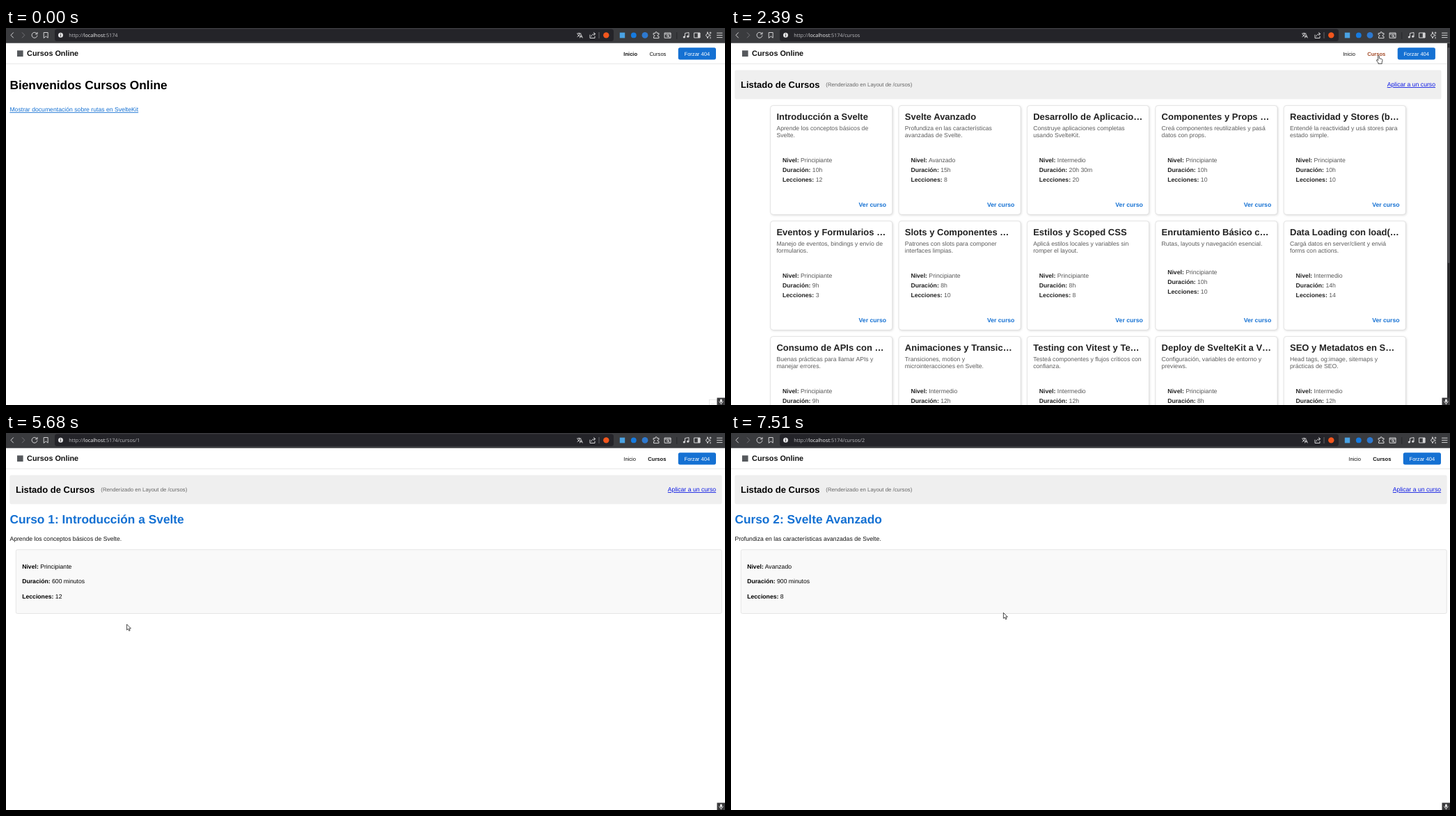
Recreate the animation shown at these times as an HTML page. Size 1033x542 px, loop 8000 ms.

```html
<!DOCTYPE html>
<html lang="es">
<head>
<meta charset="utf-8">
<title>Cursos Online</title>
<style>
html, body { margin: 0; width: 100%; height: 100%; overflow: hidden; background: #fff; }
svg { display: block; width: 1033px; height: 542px; }
text { font-family: "Liberation Sans", Arial, sans-serif; text-rendering: geometricPrecision; white-space: pre; }
.b { font-weight: 700; }
.u { text-decoration: underline; }
.end { text-anchor: end; }
.url { font-family: "Open Sans", sans-serif; }
.card { fill: #fff; stroke: #d2d2d2; stroke-width: .6; filter: drop-shadow(1px 1px 1.4px rgba(0,0,0,.13)); }
.icon { fill: none; stroke: #d4d4d6; stroke-width: 1; stroke-linecap: round; stroke-linejoin: round; }
</style>
</head>
<body>
<svg id="stage" viewBox="0 0 1033 542"></svg>
<script>
const BLUE = '#1571d3';
const LOOP = 8000;

const text = (x, y, size, str, fill = '#000', cls = '') =>
  `<text x="${x}" y="${y}" font-size="${size}" fill="${fill}" class="${cls}">${str}</text>`;
const rect = (x, y, w, h, fill, extra = '') =>
  `<rect x="${x}" y="${y}" width="${w}" height="${h}" fill="${fill}" ${extra}/>`;
const dot = (x, y, r, fill) => `<circle cx="${x}" cy="${y}" r="${r}" fill="${fill}"/>`;
const icon = (d, extra = '') => `<path class="icon" d="${d}" ${extra}/>`;
const field = (x, y, size, label, value, fill, valueFill = fill) =>
  text(x, y, size, `<tspan class="b">${label}:</tspan><tspan fill="${valueFill}"> ${value}</tspan>`, fill);

function browserBar() {
  return rect(0, 0, 1033, 21.7, '#3a3b3e') + rect(70, 1.5, 803, 17.5, '#242429', 'rx="3.5"') +
    icon('M10.5 6.7L7 10.3L10.5 14') +
    icon('M23.3 6.7L26.8 10.3L23.3 14', 'id="forward"') +
    icon('M44.5 8.2A4 4 0 1 0 45 11M45 6.4V8.8H42.5') +
    icon('M54.6 6.5H60.2V14.2L57.4 11.9L54.6 14.2Z') +
    dot(78.5, 10.3, 3.5, '#e2e2e4') + rect(78, 9.8, 1, 2.4, '#333') + rect(78, 8.1, 1, 1, '#333') +
    `<text x="90.3" y="13" font-size="7.25" fill="#bdbdc1" class="url">http://<tspan fill="#f4f4f5">localhost</tspan>:5174<tspan id="path"></tspan></text>` +
    icon('M820.5 8H826M823.2 7V8M825 8Q824 11 821 12.5M821.5 9.5L824 12M824.5 14L826.3 9.5L828.2 14M825.2 12.6H827.5', 'stroke-width=".8"') +
    icon('M839 10V14.5H846V12M841 12Q841 8.5 846.5 8.5M844.5 6.5L846.7 8.5L844.5 10.5') +
    rect(851.6, 6, .8, 9, '#77777b') +
    dot(862.3, 10.4, 4.2, '#f2561d') +
    rect(881.8, 6.6, 7.4, 7.8, '#4aa3e4') + dot(901.8, 10.4, 3.9, '#167be0') + dot(918, 10.4, 4.4, '#2e79cf') +
    icon('M930.5 7.5H933Q932.5 5.5 934.2 5.6Q935.8 5.6 935.3 7.5H938V9.6Q936 9.4 936 11Q936 12.5 938 12.2V14.6H930.5V12.3Q932 12.3 932 11Q932 9.7 930.5 9.7Z') +
    icon('M946.5 7H955V14.3H946.5ZM946.5 8.8H955M952 12.5L953.3 13.5') +
    '<circle class="icon" cx="950.8" cy="11.3" r="1.3"/>' +
    rect(963.4, 6, .8, 10, '#222327') +
    icon('M975.5 13V7.5L981 6.5V12') + dot(974.3, 13, 1.6, '#d4d4d6') + dot(979.7, 12.2, 1.6, '#d4d4d6') +
    icon('M989 7H997V14H989Z') + rect(993.8, 7, 3.4, 7, '#d4d4d6') +
    icon('M1008 6L1009.2 9.2L1012.4 10.5L1009.2 11.7L1008 14.8L1006.8 11.7L1005 10.5L1006.8 9.2ZM1012 6V8M1011 7H1013M1012 13V15') +
    icon('M1021.5 7.2H1029M1021.5 10.4H1029M1021.5 13.6H1029');
}

// Shared page header; the vertical scrollbar pushes the right side by 8 px.
function header(active, shift) {
  const home = active === 'Inicio';
  return rect(0, 51.2, 1033, .8, '#e4e4e4') +
    rect(16, 32.3, 8.6, 8.8, '#55585c') +
    text(30.1, 40.3, 10.83, 'Cursos Online', '#111', 'b') +
    text(887.3 - shift, 39.7, 7.58, 'Inicio', '#111', home ? 'b' : '') +
    text((home ? 924.4 : 922.3) - shift, 39.7, 7.58, 'Cursos', '#111', 'nav ' + (home ? '' : 'b')) +
    rect(965.8 - shift, 28.2, 54.2, 17.2, BLUE, 'rx="2.6"') +
    text(974.5 - shift, 39.7, 7.58, 'Forzar 404', '#fff');
}

const banner = shift => rect(5.4, 60.6, 1023.2 - shift, 41.6, '#efefef', 'rx="2.2"') +
  text(14, 85.7, 13, 'Listado de Cursos', '#000', 'b') +
  text(136.3, 84, 7.8, '(Renderizado en Layout de /cursos)', '#666') +
  text(1020.1 - shift, 84, 8.67, 'Aplicar a un curso', '#0b18e4', 'u end');

const homePage = header('Inicio', 0) +
  text(5.4, 88, 17.33, 'Bienvenidos Cursos Online', '#000', 'b') +
  text(5.4, 120.2, 8.67, 'Mostrar documentación sobre rutas en SvelteKit', BLUE, 'u');

const courses = `Introducción a Svelte|Aprende los conceptos básicos de|Svelte.|Principiante|10h|12
Svelte Avanzado|Profundiza en las características|avanzadas de Svelte.|Avanzado|15h|8
Desarrollo de Aplicacio…|Construye aplicaciones completas|usando SvelteKit.|Intermedio|20h 30m|20
Componentes y Props …|Creá componentes reutilizables y pasá|datos con props.|Principiante|10h|10
Reactividad y Stores (b…|Entendé la reactividad y usá stores para|estado simple.|Principiante|10h|10
Eventos y Formularios …|Manejo de eventos, bindings y envío de|formularios.|Principiante|9h|3
Slots y Componentes …|Patrones con slots para componer|interfaces limpias.|Principiante|8h|10
Estilos y Scoped CSS|Aplicá estilos locales y variables sin|romper el layout.|Principiante|8h|8
Enrutamiento Básico c…|Rutas, layouts y navegación esencial.||Principiante|10h|10
Data Loading con load(…|Cargá datos en server/client y enviá|forms con actions.|Intermedio|14h|14
Consumo de APIs con …|Buenas prácticas para llamar APIs y|manejar errores.|Principiante|9h|10
Animaciones y Transic…|Transiciones, motion y|microinteracciones en Svelte.|Intermedio|12h|10
Testing con Vitest y Te…|Testeá componentes y flujos críticos con|confianza.|Intermedio|12h|10
Deploy de SvelteKit a V…|Configuración, variables de entorno y|previews.|Principiante|8h|10
SEO y Metadatos en S…|Head tags, og:image, sitemaps y|prácticas de SEO.|Intermedio|12h|10`;

function card(line, i) {
  const [title, first, second, level, duration, lessons] = line.split('|');
  const x = 56.6 + i % 5 * 184.4, y = 111.4 + Math.floor(i / 5) * 166;
  const infoY = y + (second ? 81.7 : 76.7);
  const info = [['Nivel', level], ['Duración', duration], ['Lecciones', lessons]];
  return rect(x, y, 175.2, 156.8, '#fff', 'rx="4" class="card"') +
    text(x + 8.8, y + 21, 13, title, '#222', 'b') +
    text(x + 8.8, y + 36, 8.67, first, '#5c5c5c') +
    text(x + 8.8, y + 46, 8.67, second, '#5c5c5c') +
    info.map(([k, v], n) => field(x + 17.4, infoY + n * 14.05, 8.67, k, v, '#222', '#555')).join('') +
    text(x + 166.4, y + 145.7, 8.67, 'Ver curso', BLUE, 'b end link');
}

const listPage = header('Cursos', 8.1) + banner(8.1) +
  courses.split('\n').map(card).join('') +
  rect(1029, 21.7, 4, 521, '#2b2b2d') + rect(1029.8, 28, 2.6, 310, '#56565a', 'rx="1.3"');

const detailPage = (title, about, level, minutes, lessons) => header('Cursos', 0) + banner(0) +
  text(5.4, 129.6, 17.33, title, BLUE, 'b') +
  text(5.4, 155, 8.67, about, '#111') +
  rect(14.3, 167.7, 1014, 91.8, '#f9f9f9', 'rx="2.2" stroke="#dcdcdc" stroke-width=".7"') +
  field(23.2, 194.5, 8.67, 'Nivel', level, '#000') +
  field(23.2, 216.2, 8.67, 'Duración', minutes + ' minutos', '#000') +
  field(23.2, 238, 8.67, 'Lecciones', lessons, '#000');

const pages = [
  homePage,
  listPage,
  detailPage('Curso 1: Introducción a Svelte', 'Aprende los conceptos básicos de Svelte.', 'Principiante', 600, 12),
  detailPage('Curso 2: Svelte Avanzado', 'Profundiza en las características avanzadas de Svelte.', 'Avanzado', 900, 8)
];
const paths = ['', '/cursos', '/cursos/1', '/cursos/2'];

const outline = 'fill="#fff" stroke="#222" stroke-width=".8" stroke-linejoin="round"';
const stage = document.getElementById('stage');
stage.innerHTML = rect(0, 0, 1033, 542, '#fff') +
  pages.map(p => `<g class="page">${p}</g>`).join('') + browserBar() +
  `<g id="tip">${rect(1010.3, 534.3, 11, 9, '#fff', 'stroke="#ddd" stroke-width=".7"')}${text(1013, 541, 6, '...', '#aaa')}</g>` +
  rect(1021.5, 531.6, 11.5, 11, '#3a3a3c') +
  rect(1026, 533.6, 2.8, 4.6, '#eee', 'rx="1.4"') + icon('M1024.6 536.8Q1025 539.5 1027.4 539.5Q1029.8 539.5 1030.2 536.8M1027.4 539.5V541', 'stroke-width=".8"') +
  `<g id="cursor">
    <path id="arrow" d="M.4 .4V8.6L2.3 6.9L3.6 9.9L5 9.3L3.8 6.4H6.3Z" ${outline}/>
    <path id="hand" d="M-.9 .9Q0 -.4 .9 .9V4.2L4.2 5Q5.6 5.4 5.4 7L4.7 10V11.8H-.6V10.4L-3 7.4Q-3.3 6 -2 6.2L-.9 7.2Z" ${outline}/>
  </g>`;

const $ = id => document.getElementById(id);
const show = (el, on) => { el.style.display = on ? '' : 'none'; };
const pageEls = [...stage.querySelectorAll('.page')];
const navs = [...stage.querySelectorAll('.nav')];
const links = [...stage.querySelectorAll('.link')];

// Pointer route: time, x, y
const route = [
  [70, 1026, 531], [300, 985, 400], [840, 939.5, 268], [910, 938, 256], [1240, 925.5, 135.5],
  [1650, 927, 48], [1990, 930.5, 39.5], [2520, 930.5, 39.5], [2790, 850, 60], [3340, 357, 175],
  [3400, 330, 182], [3610, 184, 236], [3680, 181, 245], [3880, 200, 256], [4070, 200, 256],
  [4140, 202, 255], [4540, 202, 255], [4680, 201, 255], [5100, 201, 255], [5450, 166, 273],
  [5740, 175, 275], [5880, 175.5, 277], [6630, 389, 269], [6780, 384.5, 263], [6910, 390, 259],
  [7240, 391, 258], [LOOP, 391, 258]
];

function pointerAt(t) {
  const n = Math.max(1, route.findIndex(p => p[0] > t));
  const [a, b] = [route[n - 1], route[n]];
  const k = Math.max(0, (t - a[0]) / (b[0] - a[0]));
  return [a[1] + (b[1] - a[1]) * k, a[2] + (b[2] - a[2]) * k];
}

const within = (t, from, to) => t >= from && t < to;

function draw(t) {
  const page = t < 2330 ? 0 : t < 4540 ? 1 : t < 5880 ? 2 : t < 7380 ? 1 : 3;
  pageEls.forEach((el, i) => show(el, i === page));
  $('path').textContent = paths[page];
  $('forward').style.stroke = within(t, 5880, 7380) ? '#d4d4d6' : '#737377';

  const onNav = within(t, 1790, 2590);
  const onFirst = within(t, 4140, 4540), onSecond = within(t, 7240, 7380);
  navs.forEach(el => el.setAttribute('fill', onNav ? '#a34a27' : '#111'));
  links[0].classList.toggle('u', onFirst);
  links[1].classList.toggle('u', onSecond);

  const hand = onNav || within(t, 4140, 4680) || within(t, 7240, 7510);
  const [x, y] = pointerAt(t);
  $('cursor').setAttribute('transform', `translate(${x} ${y})`);
  show($('cursor'), t >= 70);
  show($('hand'), hand);
  show($('arrow'), !hand);
  show($('tip'), t < 70);
}

function frame() {
  draw(performance.now() % LOOP);
  requestAnimationFrame(frame);
}
frame();
</script>
</body>
</html>
```
